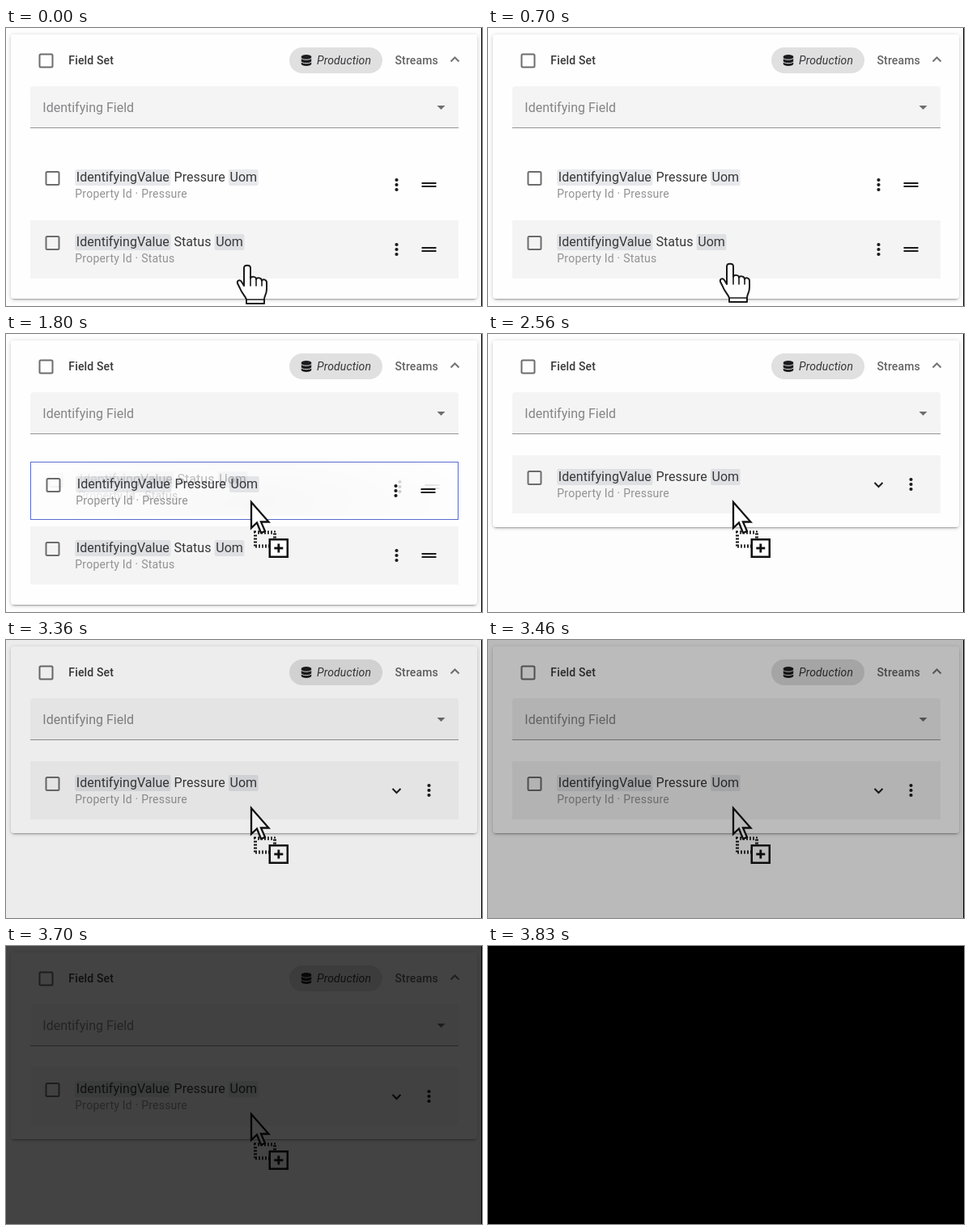
Recreate the animation shown at these times as an HTML page with a canvas. Size 588 by 344 pixels, loop 4330 ms.

```html
<!DOCTYPE html>
<html lang="en">
<head>
<meta charset="utf-8">
<title>Field set drag and drop</title>
<style>
html, body { margin: 0; width: 100%; height: 100%; overflow: hidden; background: #fdfdfd; }
canvas { display: block; width: 588px; height: 344px; }
</style>
</head>
<body>
<canvas id="stage" width="588" height="344"></canvas>
<script>
const W = 588, H = 344, LOOP = 4330;
const stage = document.getElementById('stage').getContext('2d');
const INK = '#1c1c1e', TYPE = '#38383a', GREY = '#f4f4f4';

// Pointer height by step (30 steps per second)
const PATH = [[20, 0], [33, -32], [36, -39], [52, -83], [54, -86]];
const DRAG = 23, DROP = 76, FADE = 100, BLACK = 115;

function lift(n) {
  if (n <= PATH[0][0]) return 0;
  for (let i = 1; i < PATH.length; i++) {
    const [a, ya] = PATH[i - 1], [b, yb] = PATH[i];
    if (n <= b) return Math.round(ya + (yb - ya) * (n - a) / (b - a));
  }
  return PATH[PATH.length - 1][1];
}

function text(c, str, x, y, font, color, spacing = 0) {
  c.font = font + ' Roboto, Arial, sans-serif';
  c.letterSpacing = spacing + 'px';
  c.fillStyle = color;
  c.fillText(str, x, y);
  return c.measureText(str).width;
}

function box(c, x, y, w, h, r, color) {
  c.fillStyle = color;
  c.beginPath();
  c.roundRect(x, y, w, h, r);
  c.fill();
}

function line(c, pts, width, color) {
  c.strokeStyle = color;
  c.lineWidth = width;
  c.beginPath();
  pts.forEach(([x, y]) => c.lineTo(x, y));
  c.stroke();
}

function checkbox(c, x, y) {
  c.strokeStyle = '#6c6c6e';
  c.lineWidth = 2;
  c.beginPath();
  c.roundRect(x - 8, y - 8, 16, 16, 1.5);
  c.stroke();
}

function dots(c, x, y) {
  c.fillStyle = INK;
  for (const dy of [-6, 0, 6]) {
    c.beginPath();
    c.arc(x, y + dy, 2.1, 0, 7);
    c.fill();
  }
}

function label(c, word, x, y) {
  const spacing = 0.04;
  const chip = (str, at) => {
    c.font = '16px Roboto, Arial, sans-serif';
    c.letterSpacing = spacing + 'px';
    const w = c.measureText(str).width + 3;
    box(c, at, y - 15, w, 20, 2, 'rgba(60,70,95,.115)');
    text(c, str, at + 1.5, y, '16px', TYPE, spacing);
    return w;
  };
  let at = x + chip('IdentifyingValue', x) + 4.2;
  at += text(c, word, at, y, '16px', TYPE, spacing) + 4.2;
  chip('Uom', at);
  text(c, 'Property Id · ' + word, x, y + 20, '14px', '#929294', 0.22);
}

function row(c, y, word, bg, outlined, closed) {
  const s = outlined ? 1 : 0;
  box(c, 30, y, 529, 72, 0, bg);
  if (outlined) {
    c.strokeStyle = '#5b6bd0';
    c.lineWidth = 1;
    c.strokeRect(30.5, y + 0.5, 528, 71);
  }
  checkbox(c, 57.5 + s, y + 28 + s);
  label(c, word, 85.3 + s, y + 32 + s);
  if (closed) {
    line(c, [[477.5, y + 34], [482.5, y + 39], [487.5, y + 34]], 2, INK);
    dots(c, 522.5, y + 36);
  } else {
    dots(c, 482.5 - s, y + 36);
    box(c, 513.5 - s, y + 33, 18, 2, 0, INK);
    box(c, 513.5 - s, y + 37, 18, 2, 0, INK);
  }
}

function stackIcon(c, x, y) {
  c.fillStyle = INK;
  c.beginPath();
  c.ellipse(x, y - 4.5, 6.2, 2.5, 0, Math.PI, 0);
  c.lineTo(x + 6.2, y + 4.5);
  c.ellipse(x, y + 4.5, 6.2, 2.5, 0, 0, Math.PI);
  c.fill();
  c.strokeStyle = '#e0e0e1';
  c.lineWidth = 1;
  for (const dy of [-3.2, 1.3]) {
    c.beginPath();
    c.ellipse(x, y + dy, 6.5, 2.4, 0, 0, Math.PI);
    c.stroke();
  }
}

function card(c, bottom) {
  c.save();
  c.shadowColor = 'rgba(0,0,0,.2)';
  c.shadowBlur = 5;
  c.shadowOffsetY = 1;
  box(c, 6, 8, 576, bottom - 8, 4, '#fff');
  c.shadowColor = 'rgba(0,0,0,.3)';
  c.shadowBlur = 2;
  box(c, 7, 9, 574, bottom - 9, 4, '#fff');
  c.restore();
  box(c, 6, 8, 576, bottom - 8, 4, '#fefefe');

  checkbox(c, 49.5, 40.5);
  text(c, 'Field Set', 77.3, 44.5, '500 14px', TYPE, 0.15);
  box(c, 350, 24, 115, 32, 16, '#e0e0e1');
  stackIcon(c, 371, 40);
  text(c, 'Production', 384, 44.5, 'italic 14px', TYPE, 0.1);
  text(c, 'Streams', 480.5, 44.5, '500 14px', '#626264', 0.15);
  line(c, [[549.5, 41.5], [554.5, 36.5], [559.5, 41.5]], 2, '#747476');

  box(c, 30, 72, 529, 52, [4, 4, 0, 0], GREY);
  box(c, 30, 123, 529, 1, 0, '#949496');
  text(c, 'Identifying Field', 45.3, 104.4, '16px', '#858587');
  c.fillStyle = '#6e6e70';
  c.beginPath();
  c.moveTo(532.5, 96);
  c.lineTo(542.5, 96);
  c.lineTo(537.5, 101);
  c.fill();
}

const HAND = 'M-4 25V3C-4-1.5 4-1.5 4 3V16C5 13 11 13 11 17C12 14 18 15 18 19' +
  'C19 16 24 17 24 21V29C24 36 21 37 21 42V47H-1V42C-2 38-7 34-9 28' +
  'L-12 22C-13 18-9 17-7 20Z';

function hand(c, x, y) {
  const shape = new Path2D(HAND);
  c.save();
  c.translate(x, y);
  c.lineJoin = c.lineCap = 'round';
  c.strokeStyle = '#1a1a1a';
  c.lineWidth = 2;
  c.fillStyle = '#fff';
  c.fill(shape);
  c.stroke(shape);
  c.lineWidth = 1.6;
  c.stroke(new Path2D('M4 13V25M11 16V25M18 18V25M-1 42H21'));
  c.restore();
}

function dragCursor(c, x, y) {
  c.save();
  c.translate(x, y);
  // Drop outline: two dashed rings, out of step
  c.strokeStyle = '#fff';
  c.lineWidth = 4;
  c.strokeRect(6, 37.5, 24, 17);
  c.strokeStyle = '#111';
  c.setLineDash([2, 2]);
  c.lineWidth = 2;
  c.strokeRect(5, 36.5, 26, 19);
  c.lineDashOffset = 2;
  c.strokeRect(7, 38.5, 22, 15);
  c.setLineDash([]);

  const arrow = new Path2D('M1 0V32L8 25.5L13 38L18 36L13 24.5H22.5Z');
  c.fillStyle = '#fff';
  c.fill(arrow);
  c.strokeStyle = '#111';
  c.lineWidth = 2.3;
  c.stroke(arrow);

  box(c, 22.5, 45, 24.5, 24, 0, '#111');
  box(c, 25, 47.5, 19.5, 19, 0, '#fff');
  box(c, 29.3, 55.6, 11, 2.8, 0, '#111');
  box(c, 33.4, 51.5, 2.8, 11, 0, '#111');
  c.restore();
}

// Dragged row, fading away from the grab point
function makeGhost() {
  const el = document.createElement('canvas');
  el.width = W;
  el.height = H;
  const c = el.getContext('2d');
  row(c, 238, 'Status', 'rgba(0,0,0,.04)');
  c.globalCompositeOperation = 'destination-in';
  c.translate(298, 294);
  c.scale(1, 0.28);
  const g = c.createRadialGradient(0, 0, 0, 0, 0, 290);
  g.addColorStop(0, 'rgba(0,0,0,.62)');
  g.addColorStop(1, 'rgba(0,0,0,0)');
  c.fillStyle = g;
  c.fillRect(-W, -H * 4, W * 2, H * 8);
  return el;
}
const ghost = makeGhost();

function draw(t) {
  const c = stage, n = Math.floor((t + 7) * 0.03);
  const dy = lift(n), tipY = 294 + dy;
  const over = n >= DRAG && tipY < 230;

  c.fillStyle = '#fdfdfd';
  c.fillRect(0, 0, W, H);
  if (n < DROP) {
    card(c, 335);
    row(c, 158, 'Pressure', '#fefefe', over);
    row(c, 238, 'Status', GREY);
  } else {
    card(c, 239);
    row(c, 150, 'Pressure', GREY, false, true);
  }
  if (n >= DRAG && n < DROP) c.drawImage(ghost, 4, dy + 1);
  if (n < DRAG) hand(c, 298 + Math.max(0, n - 20), tipY);
  else dragCursor(c, over ? 302 : 301.3, tipY);

  if (n > FADE) {
    c.fillStyle = `rgba(0,0,0,${Math.min(1, (n - FADE) / (BLACK - FADE))})`;
    c.fillRect(0, 0, W, H);
  }
  c.fillStyle = '#000';
  c.fillRect(587, 0, 1, H);
}

const start = performance.now();
function tick() {
  draw((performance.now() - start) % LOOP);
  requestAnimationFrame(tick);
}
tick();
</script>
</body>
</html>
```
